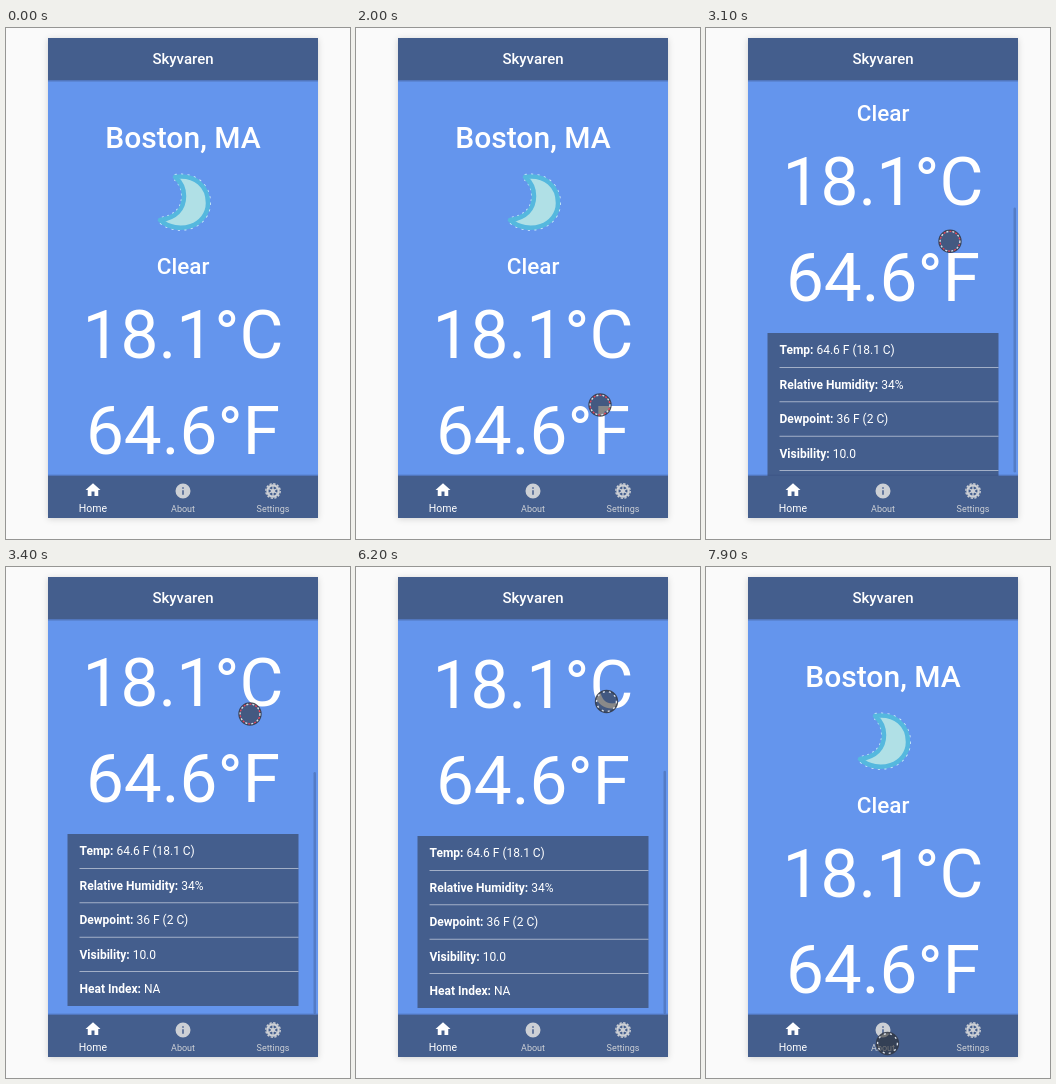
Write an HTML page that moves like this. It is 344 px wide and 511 px high and loops after 8 s.

```html
<!DOCTYPE html>
<html lang="en">
<head>
<meta charset="utf-8">
<title>Weather app</title>
<style>
  html, body { margin: 0; width: 100%; height: 100%; overflow: hidden; background: #fafafa; }
  svg { display: block; width: 344px; height: 511px; font-family: Roboto, sans-serif; }
  text { fill: #fff; }
  .mid { text-anchor: middle; }
  .medium { font-weight: 500; }
  .bold { font-weight: 700; }
  .huge { font-size: 67.5px; }
  .phone { fill: #6495ed; filter: drop-shadow(0 1px 3px rgba(0, 0, 0, .16)); }
  .bar { fill: #445e8d; }
  .edge { fill: #3a5180; opacity: .45; }
  .idle { fill: #cdd0d5; }
  .tab { font-size: 9px; }
  .ring { fill: none; stroke-width: 1.4; }
  .dash { stroke-dasharray: 2 4.095; }
</style>
</head>
<body>
<svg viewBox="0 0 344 511">
  <defs>
    <clipPath id="view"><rect x="42" y="74" width="270" height="374"/></clipPath>
    <path id="moon" stroke-linejoin="round" d="M169 149C190 146 202 159 202 175C202 198 172 208 154 192C170 190 178 181 178 168C178 160 175 154 169 149Z"/>
  </defs>

  <rect class="phone" x="42" y="10" width="270" height="480"/>

  <g clip-path="url(#view)">
    <g id="page">
      <text class="mid medium" x="177" y="120" font-size="30">Boston, MA</text>
      <use href="#moon" fill="none" stroke="#d5eefa" stroke-width="6" stroke-dasharray="2 4"/>
      <use href="#moon" fill="#b0e0e6" stroke="#55b8de" stroke-width="4.500"/>
      <text class="mid medium" x="177" y="246" font-size="22.500">Clear</text>
      <text class="mid huge" x="177" y="330">18.1°C</text>
      <text class="mid huge" x="177" y="426">64.6°F</text>
      <g id="card" font-size="12"><rect class="bar" x="61.500" y="458" width="231" height="172"/></g>
    </g>
    <rect id="thumb" x="307.500" width="2.500" rx="1.250" fill="#000" fill-opacity=".17"/>
  </g>

  <rect class="bar" x="42" y="10" width="270" height="42"/>
  <rect class="edge" x="42" y="52" width="270" height="1.500"/>
  <text class="mid medium" x="177" y="36" font-size="15">Skyvaren</text>

  <rect class="edge" x="42" y="446.700" width="270" height="1.300"/>
  <rect class="bar" x="42" y="448" width="270" height="42"/>
  <path d="M10 20v-6h4v6h5v-8h3L12 3 2 12h3v8z" fill="#fff" transform="translate(78 453) scale(.75)"/>
  <text class="mid" x="87" y="483.500" font-size="10.500">Home</text>
  <path class="idle" d="M12 2a10 10 0 1 0 0 20 10 10 0 1 0 0-20zm1 15h-2v-6h2zm0-8h-2V7h2z" transform="translate(168 454) scale(.75)"/>
  <text class="mid tab idle" x="177" y="483.500">About</text>
  <g id="gear" transform="translate(267 463)" fill="none" stroke="#cdd0d5">
    <circle r="7.200" stroke-width="1.400" stroke-dasharray="2.270 1.500"/>
    <circle r="5.600" stroke-width="2.200"/>
    <circle r="1.800" fill="#cdd0d5"/>
  </g>
  <text class="mid tab idle" x="267" y="483.500">Settings</text>

  <g id="touch">
    <circle r="11" fill="#282828" fill-opacity=".55"/>
    <circle class="ring" r="11" stroke="#333a48" stroke-opacity=".85"/>
    <circle class="ring dash" r="9.900" stroke="#d8dde6"/>
    <circle class="ring dash" r="9.900" stroke="#e8465a" stroke-dashoffset="3" id="glow"/>
  </g>
</svg>
<script>
const $ = id => document.getElementById(id);
const clamp = (v, lo, hi) => Math.min(hi, Math.max(lo, v));
const LOOP = 8000, STEP = 100, MAX_SCROLL = 191;

function add(parent, tag, attrs, text = '') {
  const el = document.createElementNS('http://www.w3.org/2000/svg', tag);
  for (const key in attrs) el.setAttribute(key, attrs[key]);
  el.textContent = text;
  return parent.appendChild(el);
}

const readings = {
  'Temp:': '64.6 F (18.1 C)', 'Relative Humidity:': '34%',
  'Dewpoint:': '36 F (2 C)', 'Visibility:': '10.0', 'Heat Index:': 'NA'
};
Object.entries(readings).forEach(([label, value], i) => {
  const y = 458 + i * 34.4;
  const line = add($('card'), 'text', { x: 73.5, y: y + 21.3 });
  add(line, 'tspan', { class: 'bold' }, label);
  add(line, 'tspan', {}, ' ' + value);
  if (i) add($('card'), 'rect', { x: 73.5, y: y - .4, width: 219, height: .8, fill: '#b9c3d6' });
});
for (let a = 0; a < 360; a += 60)
  add($('gear'), 'path', { d: 'M0 0V-5', transform: `rotate(${a})`, 'stroke-width': 1.2 });

// Each move carries the touch point on to (x, y); a power above 1 slows its end.
const moves = [
  { from: 200, to: 1000, x: 235, y: 267, power: 1 },
  { from: 1000, to: 2000, x: 244, y: 377, power: 2 },
  { from: 2200, to: 2400, x: 244, y: 356, power: 1 },
  { from: 2600, to: 3500, x: 244, y: 133, power: 1.26 },
  { from: 3500, to: 4000, x: 248.5, y: 128.5, power: 1 },
  { from: 6100, to: 6200, x: 250.5, y: 134.5, power: 1 },
  { from: 6200, to: 7000, x: 259, y: 360, power: 1.1 },
  { from: 7000, to: 7700, x: 181.5, y: 476.5, power: 1.5 }
];

function touchAt(t) {
  let x = 145, y = 13;
  for (const m of moves) {
    const p = 1 - (1 - clamp((t - m.from) / (m.to - m.from), 0, 1)) ** m.power;
    x += (m.x - x) * p;
    y += (m.y - y) * p;
  }
  return { x, y };
}

// The page follows the finger, from where each drag took hold.
function scrollAt(t, y) {
  if (t < 2200) return 0;
  const grip = t < 6200 ? 366 : 323.5;
  return Math.round(clamp(grip - y, 0, MAX_SCROLL));
}

const shown = (t, on, off) => clamp((t - on) / 100, 0, 1) * clamp((off - t) / 500, 0, 1);

function draw(now) {
  const t = Math.floor((now % LOOP) / STEP) * STEP;
  const { x, y } = touchAt(t);
  const scroll = scrollAt(t, y);
  const top = 77 + scroll * .67;
  const dragging = (t >= 2000 && t < 3600) || (t > 6200 && t <= 7000);

  $('page').setAttribute('transform', `translate(0 ${-scroll})`);
  $('thumb').setAttribute('y', top);
  $('thumb').setAttribute('height', Math.min(265, 447 - top));
  $('thumb').setAttribute('opacity', Math.max(shown(t, 2300, 4000), shown(t, 6100, 7500)));
  $('touch').setAttribute('transform', `translate(${x} ${y})`);
  $('touch').setAttribute('opacity', t < 200 ? 0 : 1);
  $('glow').setAttribute('opacity', dragging ? 1 : 0);
}

const start = performance.now();
function tick() {
  draw(performance.now() - start);
  requestAnimationFrame(tick);
}
tick();
</script>
</body>
</html>
```
